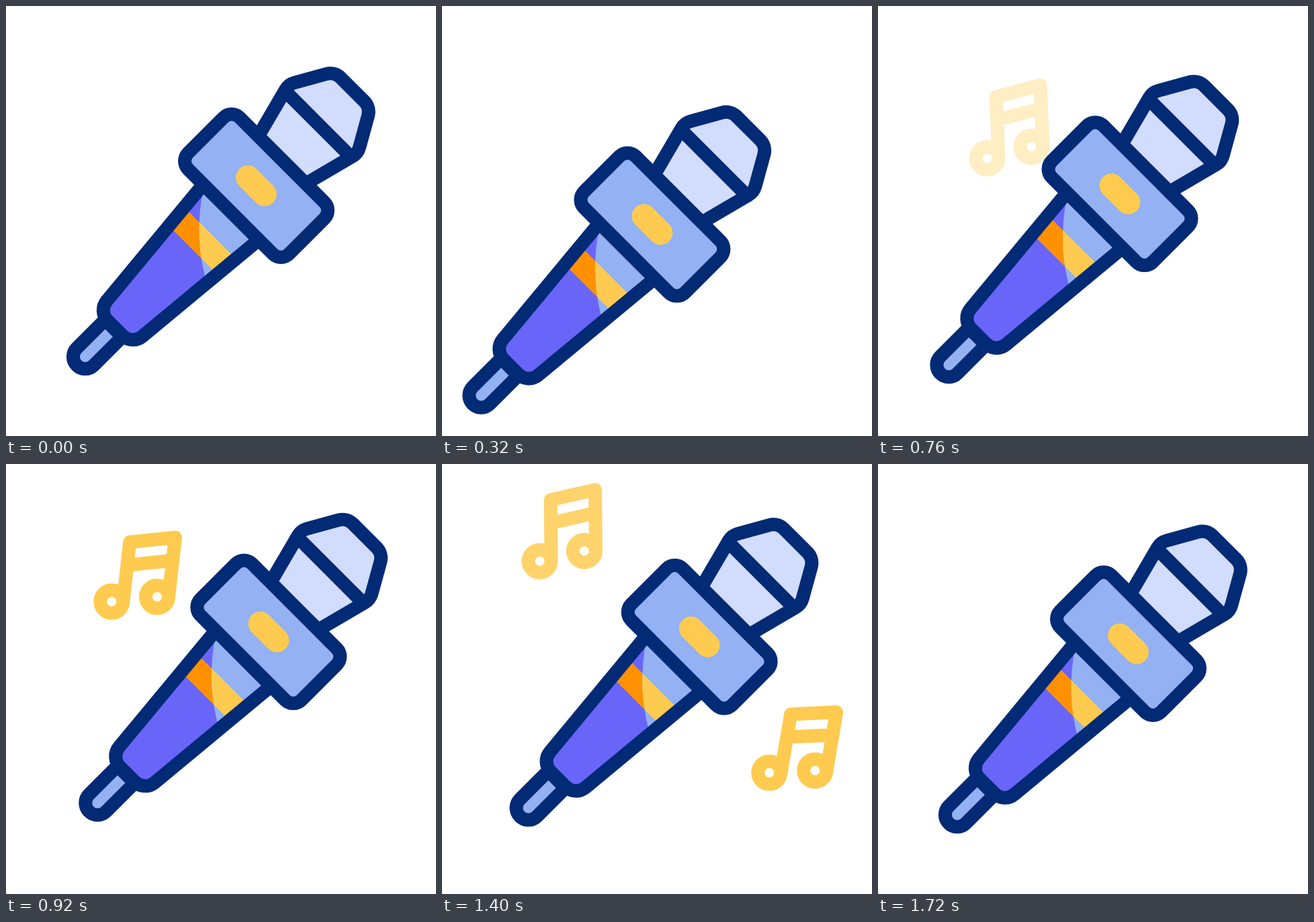
An HTML page with a canvas for the animation above (2000 ms loop, 640 px wide and 640 px high).

```html
<!DOCTYPE html>
<html lang="en">
<head>
<meta charset="utf-8">
<title>Microphone</title>
<style>
  html, body { margin: 0; width: 100%; height: 100%; overflow: hidden; background: #fff; }
  canvas { display: block; width: 640px; height: 640px; }
</style>
</head>
<body>
<canvas id="stage" width="640" height="640"></canvas>
<script>
const ctx = document.getElementById('stage').getContext('2d');
const LOOP = 2000;
const INK = '#032a75', SKY = '#93b1f3', PALE = '#d2dcfc';
const VIOLET = '#6965f8', ORANGE = '#ff9100', GOLD = '#fecb50';

const clamp = x => Math.min(1, Math.max(0, x));
const span = (t, a, b) => clamp((t - a) / (b - a));
const smooth = x => x * x * (3 - 2 * x);
const mix = (a, b, k) => a + (b - a) * k;

// cubic-bezier(1/3, 0, p, 1)
function glide(x, p) {
  let lo = 0, hi = 1;
  for (let i = 0; i < 24; i++) {
    const s = (lo + hi) / 2, r = 1 - s;
    if (r * r * s + 3 * r * s * s * p + s * s * s < x) lo = s; else hi = s;
  }
  return smooth((lo + hi) / 2);
}

// Smooth interpolation through [time, value] steps
function track(t, steps) {
  let v = steps[0][1];
  for (let i = 1; i < steps.length; i++) {
    const [t0, v0] = steps[i - 1], [t1, v1] = steps[i];
    if (t >= t0) v = mix(v0, v1, smooth(span(t, t0, t1)));
  }
  return v;
}

// Closed polygon from [x, y, radius] corners
function polygon(points) {
  const path = new Path2D(), n = points.length;
  const last = points[n - 1], first = points[0];
  path.moveTo((last[0] + first[0]) / 2, (last[1] + first[1]) / 2);
  points.forEach(([x, y, r], i) => {
    const next = points[(i + 1) % n];
    path.arcTo(x, y, next[0], next[1], r);
  });
  path.closePath();
  return path;
}

// Mirrors [halfWidth, y, radius] corners about the long axis
const mirrored = half => polygon([
  ...half,
  ...half.slice().reverse().map(([x, y, r]) => [-x, y, r])
]);

const tail = mirrored([[18, 300, 0], [18, 378, 17.9]]);
const body = mirrored([[58.6, 52, 0], [35.6, 298.5, 22]]);
const head = mirrored([[50, -54, 0], [72.7, -141, 22], [37.7, -202.5, 22]]);
const collar = mirrored([[106.2, -54.3, 17], [106.2, 54.3, 17]]);

const note = new Path2D();
for (const [x, y] of [[-44, 16], [22.5, 1.5]]) {
  note.moveTo(x + 17, y);
  note.arc(x, y, 17, 0, Math.PI * 2);
}
note.moveTo(-27, 16);
note.lineTo(-27, -75);
note.lineTo(39.5, -89.5);
note.lineTo(39.5, 1.5);
note.moveTo(-27, -40.5);
note.lineTo(39.5, -55);

function line(x0, x1, y, width, color) {
  ctx.lineWidth = width;
  ctx.strokeStyle = color;
  ctx.beginPath();
  ctx.moveTo(x0, y);
  ctx.lineTo(x1, y);
  ctx.stroke();
}

function outline(path) {
  ctx.lineWidth = 20;
  ctx.strokeStyle = INK;
  ctx.stroke(path);
}

function shape(path, color) {
  ctx.fillStyle = color;
  ctx.fill(path);
  outline(path);
}

function stripes(base, band) {
  ctx.fillStyle = base;
  ctx.fillRect(-80, 40, 160, 280);
  ctx.fillStyle = band;
  ctx.fillRect(-80, 98.3, 160, 36);
}

function drawBody() {
  ctx.save();
  ctx.translate(1.2, 0);
  ctx.save();
  ctx.clip(body);
  stripes(VIOLET, ORANGE);
  ctx.beginPath();
  ctx.arc(189.4, -99.3, 290, 0, Math.PI * 2);
  ctx.clip();
  stripes(SKY, GOLD);
  ctx.restore();
  outline(body);
  ctx.restore();
}

function drawMic(x, y) {
  ctx.save();
  ctx.translate(372.5 + x, 267.5 + y);
  ctx.rotate(Math.PI / 4);
  shape(tail, SKY);
  drawBody();
  shape(head, PALE);
  line(-66, 66, -130, 20, INK);
  shape(collar, SKY);
  line(-17.5, 17.5, 0, 36, GOLD);
  ctx.restore();
}

const notes = [
  {
    from: [206.5, 212], to: [187.5, 119], move: [660, 1580],
    show: [720, 840], hide: [1340, 1720],
    turn: [[660, -8], [900, 6.6], [1140, -5.1], [1580, 2]]
  },
  {
    from: [535.5, 388], to: [531.5, 500], move: [1000, 1740],
    show: [930, 1050], hide: [1440, 1720],
    turn: [[930, 5], [1180, 24.5], [1420, 9.3], [1680, 15]]
  }
];

function drawNote(n, t) {
  const alpha = span(t, ...n.show) * (1 - span(t, ...n.hide));
  if (!alpha) return;
  const k = smooth(span(t, ...n.move));
  ctx.save();
  ctx.globalAlpha = alpha;
  ctx.translate(mix(n.from[0], n.to[0], k), mix(n.from[1], n.to[1], k));
  ctx.rotate(track(t, n.turn) * Math.PI / 180);
  ctx.lineWidth = 20;
  ctx.strokeStyle = GOLD;
  ctx.stroke(note);
  ctx.restore();
}

function micOffset(t) {
  const down = glide(span(t, 0, 480), 0);
  const up = glide(span(t, 600, 1200), 0);
  const back = glide(span(t, 1235, 1720), 0.1);
  const along = (low, high) => mix(mix(low * down, high, up), 0, back);
  return [along(-62.6, 28.3), along(60.5, -27.2)];
}

function draw(t) {
  ctx.fillStyle = '#fff';
  ctx.fillRect(0, 0, 640, 640);
  ctx.lineCap = ctx.lineJoin = 'round';
  notes.forEach(n => drawNote(n, t));
  drawMic(...micOffset(t));
}

const start = performance.now();
function tick() {
  draw((performance.now() - start) % LOOP);
  requestAnimationFrame(tick);
}
tick();
</script>
</body>
</html>
```
